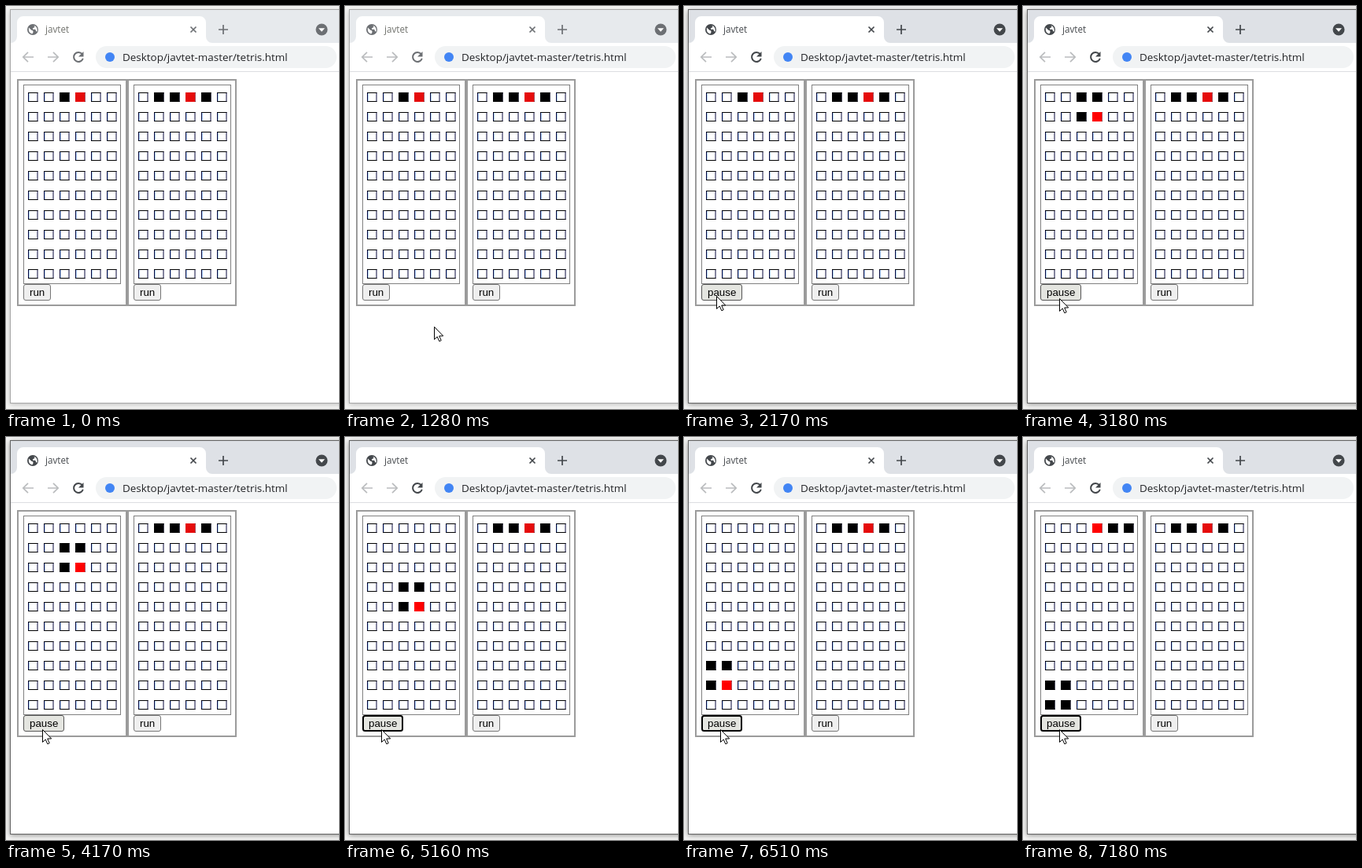
These frames come from a looping animation (423 by 513 pixels, 8000 ms). An HTML page:

```html
<!DOCTYPE html>
<html lang="en">
<head>
<meta charset="utf-8">
<title>javtet</title>
<style>
  html, body { margin: 0; width: 100%; height: 100%; overflow: hidden; background: #f3f3f2; }
  svg { display: block; width: 423px; height: 513px; }
  svg {
    --strip: #e7eaed; --edge: #a6a6a6; --icon: #6c6f73; --title: #70716c; --shade: .22;
  }
  svg.active {
    --strip: #dee1e6; --edge: #636363; --icon: #43474b; --title: #45494d; --shade: .42;
  }
  .window { fill: #fff; stroke: var(--edge); }
  .shadow { fill: #000; opacity: var(--shade); }
  .line { fill: none; stroke: var(--icon); stroke-width: 1.7; }
  .solid { fill: var(--icon); }
  .ui { font-family: "Open Sans", "Noto Sans", sans-serif; }
  .button text { font: 13.333px "Liberation Sans", Arial, sans-serif; fill: #000; }
  .face { fill: #efefef; stroke: #767676; }
  .hover .face { fill: #e4e5e0; stroke: #555; }
  .focus .face { stroke: #000; stroke-width: 2; }
</style>
</head>
<body>
<svg id="stage" viewBox="0 0 423 513">
  <defs>
    <filter id="blur" x="-10%" y="-10%" width="120%" height="120%"><feGaussianBlur stdDeviation="3"/></filter>
  </defs>

  <rect class="shadow" x="5" y="6" width="440" height="501" filter="url(#blur)"/>
  <rect class="window" x="5.5" y="4.5" width="440" height="501"/>
  <rect x="6" y="5" width="417" height="42" fill="var(--strip)"/>

  <!-- tab -->
  <path fill="#fff" d="M6 47a8 8 0 0 0 8-8V21a8 8 0 0 1 8-8H246a8 8 0 0 1 8 8V39a8 8 0 0 0 8 8Z"/>
  <circle class="solid" cx="34" cy="30" r="7"/>
  <path fill="#fff" d="M29 27.5l3.4 3.3 2 .6v2.6l-1.2 1.4c-3-.5-5-3.2-4.2-7.900ZM33 25.200h3.300v1.800l-2.300 1.300v1.500h3.300l1 2.500 1.200.200c.8-2.500-.2-6-3-7.500Z"/>
  <text class="ui" x="50" y="34" font-size="11.7" fill="var(--title)">javtet</text>
  <path class="line" d="M234.500 26.500l7 7m0-7l-7 7"/>
  <path class="line" d="M270 30h12M276 24v12"/>
  <circle class="solid" cx="401" cy="30" r="7.500"/>
  <path fill="#fff" d="M397 28.300h8l-4 4.400Z"/>

  <!-- toolbar -->
  <path class="line" style="stroke:#babcbe" d="M35 65H22.500M28 58.800L21.800 65l6.200 6.200M53 65h12.500M60 58.800L66.200 65 60 71.200"/>
  <path class="line" style="stroke-width:2" d="M96.800 61.200A6 6 0 1 0 97.800 66.700"/>
  <path class="solid" d="M98.500 58v6.500H92Z"/>
  <rect x="114" y="51" width="306" height="28" rx="14" fill="#f1f3f4"/>
  <circle cx="132" cy="65" r="6" fill="#4285f4"/>
  <text class="ui" x="148" y="70" font-size="13.45" fill="#232427">Desktop/javtet-master/tetris.html</text>
  <path stroke="#dcdee1" d="M6 83.500H423"/>

  <g id="page"></g>

  <path id="cursor" fill="#fff" stroke="#000" stroke-linejoin="miter"
    d="M.5.5V16.500L4.200 13 6.800 18.800 9.200 17.700 6.700 12H11.700Z"/>
</svg>

<script>
const LOOP = 8000, COLS = 6, ROWS = 10;
const DULL_RED = "#e50b0b", RED = "#ff0000";
const stage = document.getElementById("stage");
const page = document.getElementById("page");
const cursor = document.getElementById("cursor");

function add(parent, tag, attrs) {
  const node = document.createElementNS("http://www.w3.org/2000/svg", tag);
  for (const key in attrs) node.setAttribute(key, attrs[key]);
  parent.append(node);
  return node;
}

function makeBoard(x, width) {
  add(page, "rect", { x: x + 1, y: 94, width: width - 2, height: 287, fill: "none", stroke: "#9b9b9b", "stroke-width": 2 });
  add(page, "rect", { x: x + 8.5, y: 100.5, width: 123, height: 253, fill: "none", stroke: "#808080" });
  const fills = [];
  for (let row = 0; row < ROWS; row++) {
    for (let col = 0; col < COLS; col++) {
      const left = x + 14 + col * 20, top = 110 + row * 25;
      add(page, "path", { d: `M${left + 1.5} ${top + 1}v10`, stroke: "#b5d8ff" });
      add(page, "path", { d: `M${left + .5} ${top}v12M${left + 12} ${top}v12`, stroke: "#08083c" });
      add(page, "path", { d: `M${left} ${top + .5}h12.500M${left} ${top + 11.5}h12.500`, stroke: "#000" });
      fills.push(add(page, "rect", { x: left, y: top, width: 12.4, height: 12 }));
    }
  }
  const button = add(page, "g", { class: "button" });
  const face = add(button, "rect", { x: x + 8.5, y: 354.5, height: 20, rx: 2.5, class: "face" });
  const label = add(button, "text", { x: x + 16, y: 369 });
  return { fills, button, face, label };
}

// Each block is [column, row, colour]; blocks above the top row are skipped.
function paint(board, blocks) {
  for (const cell of board.fills) cell.setAttribute("fill", "none");
  for (const [col, row, color] of blocks)
    if (row >= 0) board.fills[row * COLS + col].setAttribute("fill", color);
}

function setButton(board, text, hover, focus) {
  const inset = focus ? 1 : .5;
  board.label.textContent = text;
  board.face.setAttribute("width", (text === "run" ? 35 : 52) - 2 * inset);
  board.face.setAttribute("height", 21 - 2 * inset);
  board.face.setAttribute("x", 22 + inset);
  board.face.setAttribute("y", 354 + inset);
  board.button.setAttribute("class", "button" + (hover ? " hover" : "") + (focus ? " focus" : ""));
}

const square = (col, row, red) => [
  [col, row - 1, "#000"], [col + 1, row - 1, "#000"], [col, row, "#000"], [col + 1, row, red]
];

// [time, left column, bottom row] of the falling square
const FALL = [
  [0, 2, 0], [3180, 2, 1], [4170, 2, 2], [5160, 2, 4], [5430, 2, 5], [5760, 1, 5],
  [5980, 0, 5], [6180, 0, 6], [6310, 0, 7], [6510, 0, 8], [6780, 0, 9]
];

// [step, x, y] of the pointer on its way to the button
const PATH = [[0, 312, 497], [7, 113, 408], [11, 57, 385], [16, 41, 369]];

function pointer(t) {
  if (t >= 2500) {
    const part = Math.min(3, Math.floor((t - 2500) / 65) + 1) / 3;
    return [41 + 5 * part, 369 + 3 * part];
  }
  const step = Math.min(16, Math.floor((t - 820) / 65.7));
  const i = Math.max(1, PATH.findIndex(p => p[0] >= step));
  const [a, ax, ay] = PATH[i - 1], [b, bx, by] = PATH[i];
  const part = (step - a) / (b - a);
  return [ax + (bx - ax) * part, ay + (by - ay) * part];
}

const left = makeBoard(14, 140);
const right = makeBoard(154, 139);
paint(right, [[1, 0, "#000"], [2, 0, "#000"], [3, 0, DULL_RED], [4, 0, "#000"]]);
right.label.textContent = "run";
right.face.setAttribute("width", 34);

function draw() {
  const t = performance.now() % LOOP;
  stage.classList.toggle("active", t >= 2100);

  if (t >= 7180) {
    paint(left, [...square(0, 9, "#000"), [3, 0, RED], [4, 0, "#000"], [5, 0, "#000"]]);
  } else {
    const [, col, row] = FALL.findLast(f => f[0] <= t);
    paint(left, square(col, row, t < 3180 ? DULL_RED : RED));
  }

  const [x, y] = pointer(Math.max(t, 820));
  cursor.setAttribute("transform", `translate(${Math.round(x)} ${Math.round(y)})`);
  cursor.setAttribute("visibility", t < 820 ? "hidden" : "visible");
  setButton(left, t < 2170 ? "run" : "pause", t >= 820 && x < 57 && y < 375, t >= 5160);
  requestAnimationFrame(draw);
}
draw();
</script>
</body>
</html>
```
